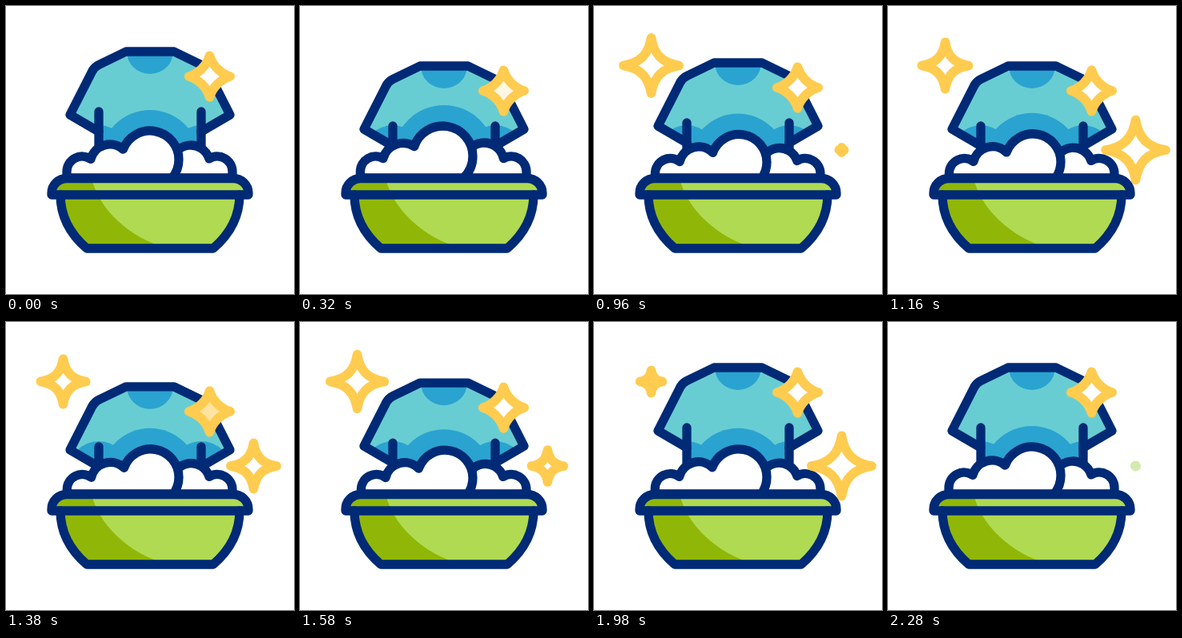
An HTML page for the animation above (2.4 s loop, 360 px wide and 360 px high).

```html
<!DOCTYPE html>
<html lang="en">
<head>
<meta charset="utf-8">
<title>Laundry basin</title>
<style>
  html, body { margin: 0; width: 100%; height: 100%; overflow: hidden; background: #fff; }
  svg { display: block; width: 100%; height: 100%; }
  .line { stroke: #002a76; stroke-width: 11.3; stroke-linecap: round; stroke-linejoin: round; }
  .star { fill: #fff; stroke: #ffcc50; stroke-width: 11.6; stroke-linejoin: round; }
</style>
</head>
<body>
<svg viewBox="0 0 360 360">
  <defs>
    <clipPath id="shirtClip"><path id="clipShape"/></clipPath>
    <clipPath id="basinClip">
      <path d="M57 236V234A19 18.5 0 0 1 76 215.5H284A19 18.5 0 0 1 303 234V236H292C292 262 280 285 259 303H101C80 285 68 262 68 236Z"/>
    </clipPath>
  </defs>

  <g id="shirtFill">
    <path id="body" fill="#68cdd2"/>
    <path d="M151 57A29 28 0 0 0 209 57Z" fill="#2aa3d0"/>
  </g>
  <g clip-path="url(#shirtClip)" fill="#2aa3d0">
    <circle id="shade" cx="180"/>
    <circle cx="116" cy="187" r="38"/>
    <circle cx="244" cy="187" r="38"/>
  </g>
  <g id="shirtLine" class="line" fill="none">
    <path d="M116 132V192M244 132V192"/>
    <path d="M116 157L80 136L108 81Q111 76 116 73.5L150 57H210L244 73.5Q249 76 252 81L280 136L244 157"/>
  </g>

  <path id="foamRight" class="line" fill="#fff"/>
  <path id="foamLeft" class="line" fill="#fff"/>

  <g clip-path="url(#basinClip)">
    <rect x="50" y="210" width="260" height="100" fill="#b0da52"/>
    <path d="M50 210H106C112 248 150 290 204 303H50Z" fill="#90b708"/>
  </g>
  <g class="line" fill="none">
    <path d="M68 236C68 262 80 285 101 303H259C280 285 292 262 292 236"/>
    <path d="M57 236V234A19 18.5 0 0 1 76 215.5H284A19 18.5 0 0 1 303 234V236Z"/>
  </g>

  <path id="mainStar" class="star"/>
  <path id="leftStar" class="star" transform="translate(71.5 74.5)"/>
  <path id="rightStar" class="star" transform="translate(309.5 180)"/>
</svg>
<script>
const $ = id => document.getElementById(id);
const set = (id, name, value) => $(id).setAttribute(name, value);
const LOOP = 2400, HOLD = 2280, STEP = 20;

const shirtPath = 'M116 157L80 136L108 81Q111 76 116 73.5L150 57H210L244 73.5Q249 76 252 81L280 136L244 157V192H116Z';
set('body', 'd', shirtPath);
set('clipShape', 'd', shirtPath);

const shirtKeys = [[0, 0], [480, 24], [960, 14], [1420, 24], [1960, 0]];
const foamKeys = [[0, 0], [310, 6], [620, -1], [960, -4.5], [1380, -2.8], [1760, -5], [2280, 0]];
const sinkKeys = [[0, 0], [400, 0], [960, 2.5], [1760, 2.5], [2280, 0]];
const glowKeys = [[0, 0], [200, 0], [320, 0.3], [440, 0], [1260, 0], [1380, 1], [1500, 0]];
const leftKeys = [[580, 0], [790, 37], [1300, 27.5], [1760, 37], [2140, 0]];
const rightKeys = [[910, 0], [1180, 38], [1570, 20], [1960, 38], [2290, 0.5]];

const smooth = u => (1 - Math.cos(Math.PI * u)) / 2;

// Eased travel from key to key, held outside the range.
function ease(keys, t) {
  if (t <= keys[0][0]) return keys[0][1];
  for (let i = 1; i < keys.length; i++) {
    const [t0, v0] = keys[i - 1], [t1, v1] = keys[i];
    if (t < t1) return v0 + (v1 - v0) * smooth((t - t0) / (t1 - t0));
  }
  return keys[keys.length - 1][1];
}

// Cubic curve passing through the keys without stopping.
function spline(keys, t) {
  const slope = i => {
    const a = keys[i - 1], b = keys[i + 1];
    return a && b ? (b[1] - a[1]) / (b[0] - a[0]) : 0;
  };
  let i = 0;
  while (i < keys.length - 2 && t >= keys[i + 1][0]) i++;
  const [t0, v0] = keys[i], [t1, v1] = keys[i + 1];
  const h = t1 - t0, u = Math.min(1, (t - t0) / h), w = 1 - u;
  return v0 * (1 + 2 * u) * w * w + v1 * u * u * (3 - 2 * u)
    + h * u * w * (slope(i) * w - slope(i + 1) * u);
}

const mix = (a, b, u) => `rgb(${a.map((v, i) => Math.round(v + (b[i] - v) * u))})`;

// Upper crossing of two circles, a left of b.
function crossing(a, b) {
  const dx = b.x - a.x, dy = b.y - a.y, d = Math.hypot(dx, dy);
  const m = (d * d + a.r * a.r - b.r * b.r) / (2 * d);
  const h = Math.sqrt(Math.max(0, a.r * a.r - m * m));
  return { x: a.x + (dx * m + dy * h) / d, y: a.y + (dy * m - dx * h) / d };
}

const arc = (c, x, y) => `A${c.r} ${c.r} 0 0 1 ${x} ${y}`;

// Outline over a row of touching bubbles, standing on the rim.
function foam(row, tail) {
  const first = row[0], last = row[row.length - 1];
  let d = `M${first.x - first.r} 215V${first.y}`;
  for (let i = 0; i < row.length - 1; i++) {
    const p = crossing(row[i], row[i + 1]);
    d += arc(row[i], p.x, p.y);
  }
  return d + arc(last, last.x + last.r, last.y) + tail(last) + 'Z';
}

function starPath(tip, waist) {
  const near = waist * 0.36, far = waist * 1.42;
  const side = (sx, sy, flip) => flip
    ? `C${sx * far} ${sy * near} ${sx * near} ${sy * far} 0 ${sy * tip}`
    : `C${sx * near} ${sy * far} ${sx * far} ${sy * near} ${sx * tip} 0`;
  return `M0 ${-tip}` + side(1, -1) + side(1, 1, true) + side(-1, 1) + side(-1, -1, true) + 'Z';
}

function sideStar(id, keys, t) {
  const tip = ease(keys, t), size = Math.max(tip, 0.8);
  set(id, 'visibility', tip > 0.3 ? 'visible' : 'hidden');
  set(id, 'd', starPath(size, size * 0.28));
}

set('mainStar', 'd', starPath(25.8, 9.7));

function draw(t) {
  const dy = ease(shirtKeys, t), k = spline(foamKeys, t), sink = ease(sinkKeys, t);
  const move = `translate(0 ${dy})`;
  ['shirtFill', 'shirtLine', 'clipShape'].forEach(id => set(id, 'transform', move));

  const big = { x: 180 - 0.27 * k, y: 192 - 0.73 * k, r: 36 + 0.27 * k };
  const left = [
    { x: 95 - 0.1 * k, y: 207 + sink, r: 19 },
    { x: 130 - 0.2 * k, y: 198 - 0.12 * k + 0.7 * sink, r: 25 + 0.13 * k },
    big
  ];
  const right = [
    { x: 231 - 0.15 * k, y: 198 - 0.35 * k + 0.5 * sink, r: 24 + 0.15 * k },
    { x: 264, y: 207 + sink, r: 19 }
  ];
  const foot = c => arc(c, c.x + Math.sqrt(Math.max(0, c.r * c.r - (215 - c.y) ** 2)), 215);
  set('foamLeft', 'd', foam(left, foot));
  set('foamRight', 'd', foam(right, () => 'V215'));
  set('shade', 'cy', big.y);
  set('shade', 'r', big.r + 26);

  set('mainStar', 'transform', `translate(254.5 ${88 + dy})`);
  $('mainStar').style.fill = mix([255, 255, 255], [255, 227, 160], ease(glowKeys, t));
  sideStar('leftStar', leftKeys, t);
  sideStar('rightStar', rightKeys, t);
  const fade = Math.max(0, Math.min(1, (t - 2220) / 60));
  $('rightStar').style.stroke = mix([255, 204, 80], [212, 234, 176], fade);
  $('rightStar').style.fill = fade > 0.9 ? '#d4eab0' : '#fff';
}

let start;
function tick(now) {
  if (start === undefined) start = now;
  const t = (now - start) % LOOP;
  draw(Math.min(HOLD, Math.floor(t / STEP) * STEP));
  requestAnimationFrame(tick);
}
draw(0);
requestAnimationFrame(tick);
</script>
</body>
</html>
```
